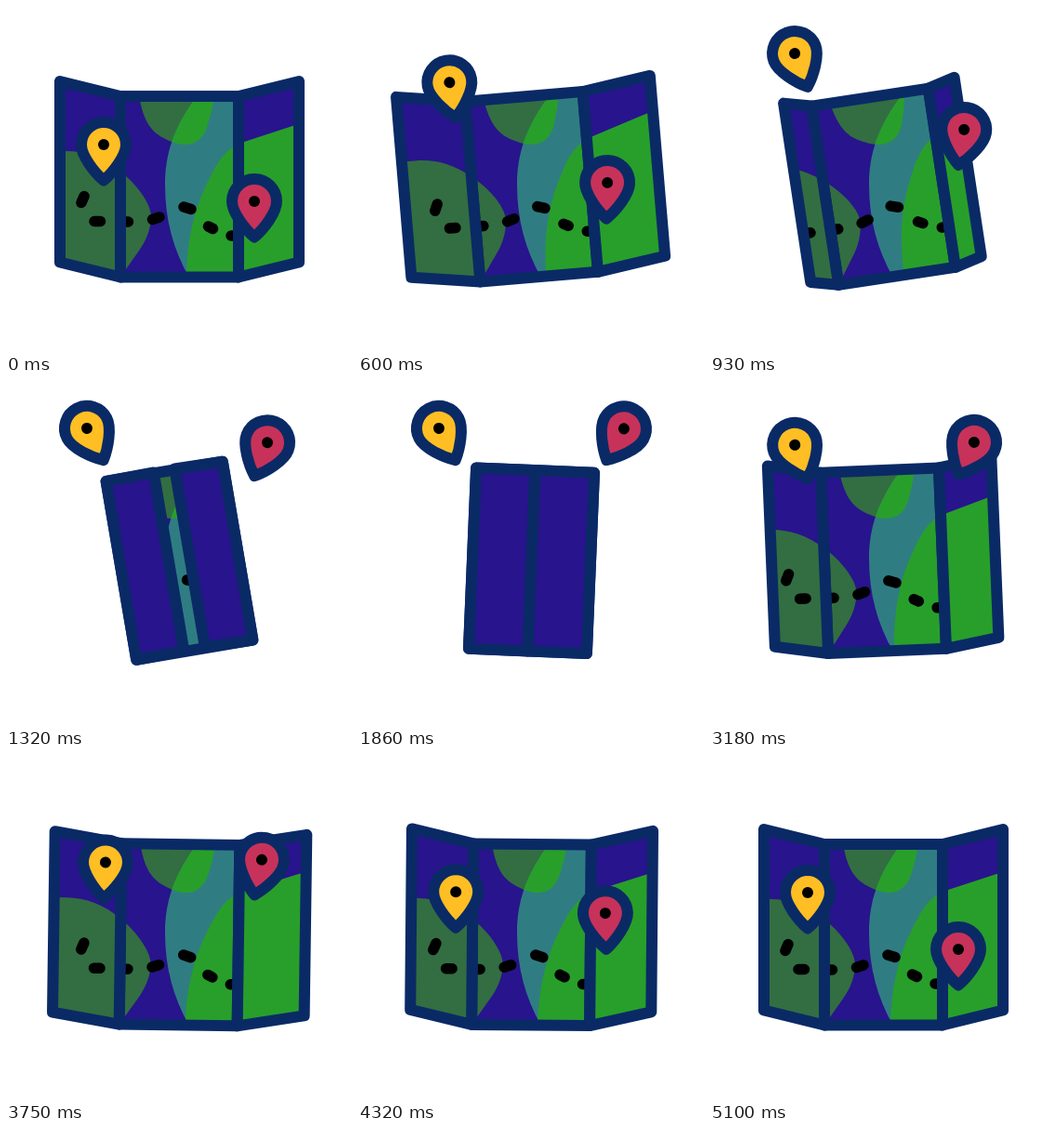
An HTML page with a canvas that plays this animation: 372x372 px, repeating every 5400 ms.

```html
<!DOCTYPE html>
<html lang="en">
<head>
<meta charset="utf-8">
<title>Folding map</title>
<style>
html, body { margin: 0; width: 100%; height: 100%; overflow: hidden; background: #fff; }
canvas { display: block; width: 100vw; height: 100vh; }
</style>
</head>
<body>
<canvas id="stage" width="372" height="372"></canvas>
<script>
const ctx = document.getElementById('stage').getContext('2d');
const LOOP = 5400, STEP = 30, REST = 5100;
const NAVY = '#0a2a66', WATER = '#28148c', TEAL = '#2f7d82';
const DARK = '#326e41', BRIGHT = '#289f2a';
const CX = 186.5, CY = 194.2, TOP = 97, BOTTOM = 291.5, LEFT = 123, RIGHT = 250;
const HOVER_Y = 86.5;

const leftLand = new Path2D('M30 156H64C85 156 105 163 123 178C139 190 156 212 156 226C156 239 151 252 143 263L122 293L30 310Z');
const rightLand = new Path2D('M250 148C232 157 224 175 216 191C206 212 195 240 194 295L340 310V119L308 129Z');
const topLand = new Path2D('M143 96C149 134 163 139 178 146C204 156 214 139 217 127Q222 112 224 96Z');
const lagoon = new Path2D('M206 96C180 130 171 160 171 192C171 230 180 262 197 292L230 330H320V60H230Z');
const trail = new Path2D('M84 204.5L81 211.5M95 231.5H101.5M127.5 232H131.5M157.5 229.5L165 227M191 216L199 218.5M217.5 237L222.5 239.5M242 247H247');
const pinShape = new Path2D('M24 0C24 12 10 30 0 38.5C-10 30 -24 12 -24 0A24 24 0 0 1 24 0Z');

const pins = [
  { x: 105, y: 188, color: '#ffbe23', lean: -27.5,
    lift: [0, 990], tip: [100, 1330], drop: [2670, 4420], right: [2875, 3860] },
  { x: 267, y: 249, color: '#c7325a', lean: 29,
    lift: [307, 1590], tip: [384, 1824], drop: [2700, 5100], right: [2810, 4640] }
];

// Sine ease from 0 to 1 between two times.
function ease(t, from, to) {
  const p = Math.min(1, Math.max(0, (t - from) / (to - from)));
  return (1 - Math.cos(Math.PI * p)) / 2;
}

// Two wide swings, then a quickening wobble that fades out.
function mapTurn(t) {
  const wobbleStart = 2220, wobbleEnd = 4590, swing = 7.5;
  if (t < wobbleStart) return (10 + swing) * ease(t, 1230, wobbleStart) - 10 * ease(t, 0, 1230);
  const s = (t - wobbleStart) / 1000;
  const fade = Math.max(0, (wobbleEnd - t) / (wobbleEnd - wobbleStart));
  return swing * fade * Math.cos(3.3 * s + 1.07 * s * s);
}

function fill(path, color) {
  ctx.fillStyle = color;
  ctx.fill(path);
}

function rotate(degrees) {
  ctx.rotate(degrees * Math.PI / 180);
}

function turnMap(degrees) {
  ctx.translate(CX, CY);
  rotate(degrees);
  ctx.translate(-CX, -CY);
}

function panelPath(x0, x1, rise) {
  const path = new Path2D();
  path.moveTo(x0, TOP);
  path.lineTo(x1, TOP - rise);
  path.lineTo(x1, BOTTOM - rise);
  path.lineTo(x0, BOTTOM);
  path.closePath();
  return path;
}

function frame(path) {
  ctx.strokeStyle = NAVY;
  ctx.lineWidth = 12;
  ctx.lineJoin = 'round';
  ctx.stroke(path);
}

function drawTrail() {
  ctx.strokeStyle = '#000';
  ctx.lineWidth = 11.5;
  ctx.lineCap = 'round';
  ctx.stroke(trail);
}

function drawPanel(path, drawLand) {
  fill(path, WATER);
  ctx.save();
  ctx.clip(path);
  drawLand();
  ctx.restore();
  frame(path);
}

function drawCentreLand(turn) {
  fill(leftLand, DARK);
  fill(topLand, DARK);
  // The lagoon stays upright while the map turns.
  ctx.save();
  turnMap(-turn);
  fill(lagoon, TEAL);
  ctx.clip(lagoon);
  turnMap(turn);
  fill(topLand, BRIGHT);
  ctx.restore();
  fill(rightLand, BRIGHT);
  drawTrail();
}

function drawMap(t) {
  const turn = mapTurn(t);
  const open = ease(t, 0, 580) - ease(t, 3400, 4590);
  const fold = ease(t, 580, 1490) - ease(t, 2430, 3400);
  const width = 65 + 8.5 * open - 137 * fold;
  const rise = 16 - 5 * open - 11 * fold;
  const drawFlap = (seam, side, land, color) =>
    drawPanel(panelPath(seam, seam + side * width, rise), () => {
      if (width < 0) return;
      fill(land, color);
      drawTrail();
    });
  ctx.save();
  turnMap(turn);
  drawPanel(panelPath(LEFT, RIGHT, 0), () => drawCentreLand(turn));
  drawFlap(LEFT, -1, leftLand, DARK);
  drawFlap(RIGHT, 1, rightLand, BRIGHT);
  ctx.restore();
}

function drawPin(pin, t) {
  const height = ease(t, ...pin.lift) - ease(t, ...pin.drop);
  const overshoot = 0.14 * (ease(t, ...pin.right) - ease(t, pin.right[1], pin.drop[1]));
  const lean = ease(t, ...pin.tip) - ease(t, ...pin.right) - overshoot;
  ctx.save();
  ctx.translate(pin.x, pin.y + (HOVER_Y - pin.y) * height);
  rotate(pin.lean * lean);
  ctx.translate(0, -39);
  fill(pinShape, pin.color);
  frame(pinShape);
  ctx.fillStyle = '#000';
  ctx.beginPath();
  ctx.arc(0, 0, 6, 0, Math.PI * 2);
  ctx.fill();
  ctx.restore();
}

function draw(now) {
  const t = Math.min(REST, Math.floor(now % LOOP / STEP) * STEP);
  ctx.fillStyle = '#fff';
  ctx.fillRect(0, 0, 372, 372);
  drawMap(t);
  for (const pin of pins) drawPin(pin, t);
}

let start;
function tick(now) {
  start ??= now;
  draw(now - start);
  requestAnimationFrame(tick);
}
draw(0);
requestAnimationFrame(tick);
</script>
</body>
</html>
```
